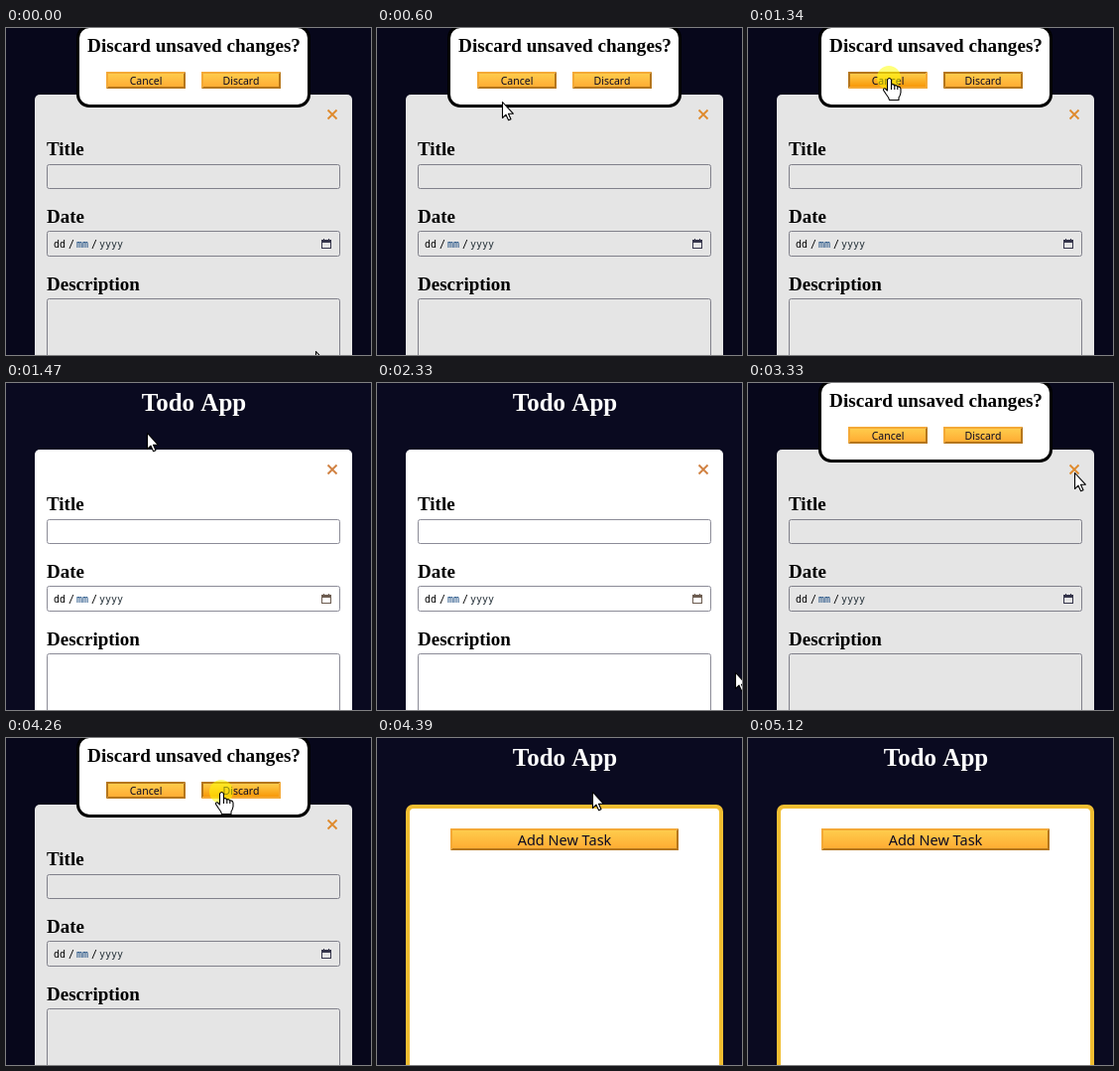
Animation, 368 px wide and 329 px high, one loop 6450 ms. Source, as an HTML page with a canvas:

```html
<!DOCTYPE html>
<html lang="en">
<head>
<meta charset="utf-8">
<title>Todo form</title>
<style>
  html, body { margin: 0; width: 100%; height: 100%; overflow: hidden; background: #0a0a20; }
  canvas { display: block; }
</style>
</head>
<body>
<canvas id="stage" width="368" height="329"></canvas>
<script>
const ctx = document.getElementById('stage').getContext('2d');
const LOOP = 6450, TICK = 66.5;
const SERIF = '"Liberation Serif", serif';
const SANS = '"Noto Sans", sans-serif';
const MONO = '"DejaVu Sans Mono", monospace';
const DARK = '#0a0a23';

// Pointer moves: start tick, end tick, x, y
const START = [312, 325];
const MOVES = [
  [0, 9, 126, 74], [11, 14, 142, 50],
  [28, 35, 361, 291], [35, 38, 328, 209], [38, 42, 329, 98], [44, 46, 329, 90],
  [50, 59, 206, 72], [59, 63, 217, 54], [72, 77, 287, 303]
];
const CANCEL = { label: 'Cancel', x: 101, y: 44, w: 80, h: 17, size: 10.5, base: 57 };
const DISCARD = { label: 'Discard', x: 197, y: 44, w: 80, h: 17, size: 10.5, base: 57 };
const ADD = { label: 'Add New Task', x: 74, y: 91, w: 230, h: 22, size: 14.5, base: 108 };

const arrow = new Path2D('M.5 .5V16.5L4 13.2L6.6 18.8L9 17.8L6.5 12.2H11.3Z');
const hand = new Path2D('M-2 13V2Q0 -1 2 2V7Q4 6 5.3 8Q7 7 8.3 9Q11 8.5 11.5 11V15Q11 18 9.5 20V22.5H0Q-.5 20 -3 17L-6 12.5Q-6 10 -4 11Z');
const knuckles = new Path2D('M2 7V12M5.3 8V12M8.3 9V12');

const between = (t, a, b) => t >= a && t < b;
const inside = (p, b) => between(p.x, b.x, b.x + b.w) && between(p.y, b.y, b.y + b.h);

function pointerAt(time) {
  const tick = Math.floor((time + 3) / TICK);
  let [x, y] = START;
  for (const [from, to, tx, ty] of MOVES) {
    if (tick <= from) break;
    const p = Math.min(1, (tick - from) / (to - from));
    const e = p * p * (3 - 2 * p);
    x += (tx - x) * e;
    y += (ty - y) * e;
  }
  return { x: Math.round(x), y: Math.round(y) };
}

function text(str, x, y, font, color, align = 'left') {
  ctx.font = font;
  ctx.fillStyle = color;
  ctx.textAlign = align;
  ctx.fillText(str, x, y);
}

function box(x, y, w, h, r, color) {
  ctx.fillStyle = color;
  ctx.beginPath();
  ctx.roundRect(x, y, w, h, r);
  ctx.fill();
}

function poly(points, color) {
  ctx.fillStyle = color;
  ctx.beginPath();
  points.forEach(([x, y]) => ctx.lineTo(x, y));
  ctx.fill();
}

function button(b, { hover = false, pressed = false, dark = false } = {}) {
  const { x, y, w, h } = b, r = x + w, d = y + h;
  const light = '#f4a936', shade = '#b5761c';
  const topLeft = pressed || dark ? shade : light;
  const bottomRight = pressed ? light : shade;
  poly([[x, y], [r, y], [r - 2, y + 2], [x + 2, y + 2], [x + 2, d - 2], [x, d]], topLeft);
  poly([[r, d], [x, d], [x + 2, d - 2], [r - 2, d - 2], [r - 2, y + 2], [r, y]], bottomRight);
  const fill = ctx.createLinearGradient(0, y + 2, 0, d - 2);
  fill.addColorStop(0, '#fecc4c');
  fill.addColorStop(1, hover ? '#f89808' : '#ffac33');
  ctx.fillStyle = fill;
  ctx.fillRect(x + 2, y + 2, w - 4, h - 4);
  text(b.label, x + w / 2, b.base, `${b.size}px ${SANS}`, DARK, 'center');
}

function field(y, h, color) {
  ctx.strokeStyle = color;
  ctx.lineWidth = 1;
  ctx.beginPath();
  ctx.roundRect(41.5, y + .5, 295, h - 1, 2);
  ctx.stroke();
}

function form(dimmed) {
  box(29, 67, 320, 280, 5, dimmed ? '#e5e5e5' : '#fff');

  ctx.strokeStyle = dimmed ? '#df8a2c' : '#d08040';
  ctx.lineWidth = 1.8;
  ctx.stroke(new Path2D('M324.5 82.5L333.5 91.5M333.5 82.5L324.5 91.5'));

  const heading = `bold 19px ${SERIF}`;
  text('Title', 41, 128, heading, '#000');
  text('Date', 41, 196, heading, '#000');
  text('Description', 41, 264, heading, '#000');

  const line = dimmed ? '#80808a' : '#8c8c98';
  field(137, 25, line);
  field(204, 26, line);
  field(272, 90, line);

  const mono = `10px ${MONO}`;
  text('dd', 48, 221, mono, '#000');
  text('/', 63, 221, mono, '#000');
  text('mm', 71, 221, mono, '#0a3f78');
  text('/', 86, 221, mono, '#000');
  text('yyyy', 94, 221, mono, '#26323a');

  const icon = dimmed ? '#34344a' : '#6c5c50';
  ctx.strokeStyle = icon;
  ctx.lineWidth = 1;
  ctx.strokeRect(318.5, 213.5, 9, 8);
  ctx.fillStyle = icon;
  ctx.fillRect(318, 213, 10, 3);
  ctx.fillRect(320, 212, 1, 1);
  ctx.fillRect(325, 212, 1, 1);
}

function dialog(pointer, clicking) {
  box(71, -3, 236, 83, 13, '#000');
  box(74, 0, 230, 77, 10, '#fff');
  text('Discard unsaved changes?', 189.5, 24, `bold 19.15px ${SERIF}`, '#000', 'center');
  for (const b of [CANCEL, DISCARD]) {
    const hover = inside(pointer, b);
    button(b, { hover, pressed: hover && clicking, dark: !hover && clicking });
  }
}

function drawPointer({ x, y }, isHand) {
  ctx.save();
  ctx.translate(x + (isHand ? .5 : 0), y);
  ctx.lineJoin = 'round';
  ctx.lineWidth = 1.1;
  ctx.strokeStyle = '#000';
  ctx.fillStyle = '#fff';
  const shape = isHand ? hand : arrow;
  ctx.fill(shape);
  ctx.stroke(shape);
  if (isHand) ctx.stroke(knuckles);
  ctx.restore();
}

function draw(time) {
  const pointer = pointerAt(time);
  const asking = time < 1470 || between(time, 3330, 4390);
  const done = time >= 4390;
  const clicking = between(time, 1340, 1470) || between(time, 3190, 3330) || between(time, 4260, 4390);

  ctx.fillStyle = asking ? '#07071b' : '#0a0a20';
  ctx.fillRect(0, 0, 368, 329);

  if (!asking) text('Todo App', 189.5, 28, `bold 25px ${SERIF}`, '#fff', 'center');
  if (done) {
    box(29, 67, 320, 280, 7, '#f1be32');
    box(33, 71, 312, 280, 4, '#fff');
    button(ADD);
  } else {
    form(asking);
  }
  if (asking) dialog(pointer, clicking);

  if (clicking) {
    ctx.fillStyle = 'rgba(255, 255, 0, .52)';
    ctx.beginPath();
    ctx.arc(pointer.x, pointer.y, 12, 0, Math.PI * 2);
    ctx.fill();
  }
  const overButton = asking && (inside(pointer, CANCEL) || inside(pointer, DISCARD));
  const overClose = !asking && !done && inside(pointer, { x: 320, y: 78, w: 18, h: 17 });
  if (time < 5120) drawPointer(pointer, overButton || overClose);
}

const begin = performance.now();
function frame() {
  draw((performance.now() - begin) % LOOP);
  requestAnimationFrame(frame);
}
frame();
</script>
</body>
</html>
```
